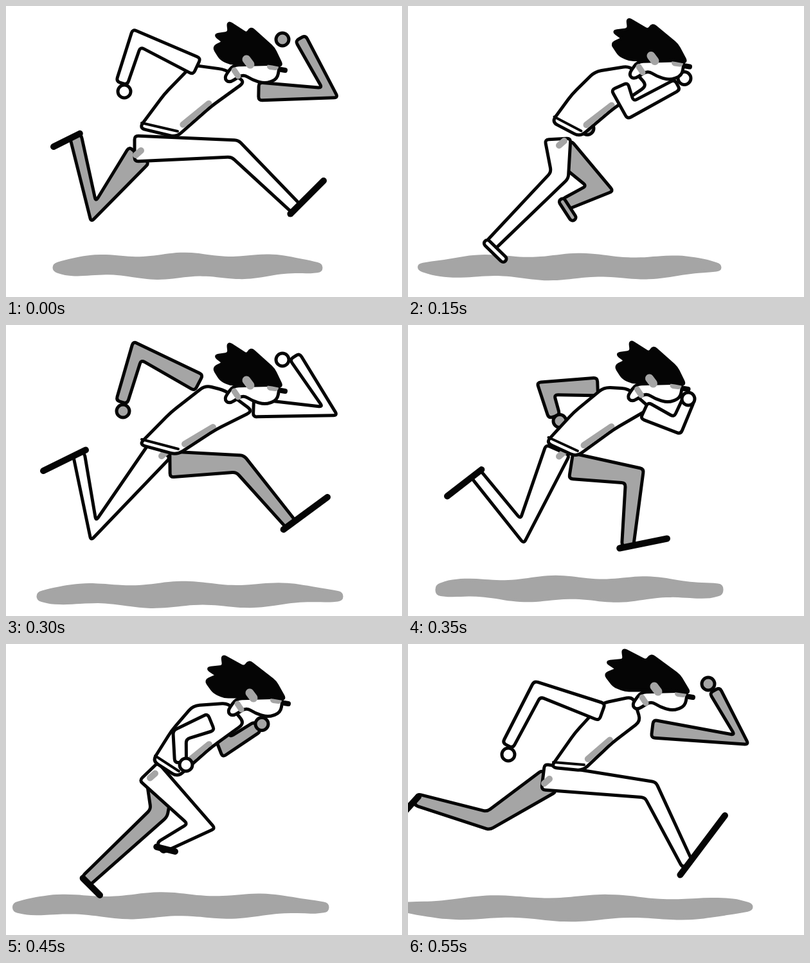
Animation, 616 px wide and 453 px high, one loop 600 ms. Source, as an HTML page with a canvas:

```html
<!DOCTYPE html>
<html lang="en">
<head>
<meta charset="utf-8">
<title>Run cycle</title>
<style>
  html, body { margin: 0; width: 100%; height: 100%; overflow: hidden; background: #fff; }
  canvas { display: block; }
</style>
</head>
<body>
<canvas id="stage" width="616" height="453"></canvas>
<script>
const ctx = document.getElementById('stage').getContext('2d');
const INK = '#050505', GREY = '#a5a5a5', WHITE = '#fff';
const STEP = 50;

// Arms: shoulder, elbow, wrist, fist. Legs: hip, knee, ankle, toe.
// Torso: shoulder, waist back, waist front, chest. Face: nose and hair stretch.
// Shadow: left, right, middle height. Sole: width of the light part of a shoe.
const solid = { sole: [0] }, hollow = { sole: [5] };

const flightNear = {
  ...solid,
  nearArm: [297, 94, 203, 50, 180, 120, 184, 133],
  farArm: [393, 133, 504, 135, 458, 50, 430, 52],
  nearLeg: [200, 222, 356, 222, 451, 315, 494, 272],
  farLeg: [207, 232, 136, 320, 108, 202, 74, 219],
  torso: [290, 92, 207, 190, 265, 204, 372, 118],
  face: [431, 100, 0.93],
  shadow: [75, 490, 405]
};

const standNear = {
  ...hollow,
  nearArm: [286, 110, 228, 160, 325, 148, 346, 136],
  farArm: [348, 138, 331, 177, 410, 186, 426, 193],
  nearLeg: [220, 210, 332, 252, 240, 385, 306, 397],
  farLeg: [221, 235, 224, 324, 98, 270, 60, 318],
  torso: [282, 98, 222, 175, 265, 207, 374, 110],
  face: [434, 97, 1],
  shadow: [50, 470, 401]
};

const pushNear = {
  ...hollow,
  nearArm: [372, 140, 464, 164, 513, 97, 514, 89],
  farArm: [275, 112, 208, 117, 133, 176, 132, 188],
  nearLeg: [246, 204, 140, 275, 15, 362, -10, 390],
  farLeg: [258, 212, 373, 244, 388, 348, 452, 340],
  torso: [300, 106, 225, 186, 270, 200, 370, 138],
  face: [436, 92, 1.03],
  shadow: [-15, 500, 411]
};

const flightFar = {
  ...solid,
  nearArm: [385, 129, 504, 134, 449, 49, 430, 54],
  farArm: [300, 90, 204, 40, 180, 120, 182, 134],
  nearLeg: [240, 194, 136, 320, 113, 200, 58, 227],
  farLeg: [255, 217, 364, 216, 443, 310, 500, 268],
  torso: [310, 94, 207, 186, 266, 202, 384, 134],
  face: [431, 103, 0.93],
  shadow: [50, 522, 420]
};

const standFar = {
  ...solid,
  nearArm: [350, 137, 334, 179, 425, 181, 442, 176],
  farArm: [290, 102, 224, 158, 275, 165, 290, 165],
  nearLeg: [226, 195, 219, 322, 98, 264, 64, 306],
  farLeg: [252, 222, 341, 254, 240, 380, 306, 397],
  torso: [300, 100, 222, 180, 258, 208, 370, 125],
  face: [434, 97, 0.96],
  shadow: [40, 454, 402]
};

const pushFar = {
  ...solid,
  nearArm: [288, 106, 206, 104, 118, 188, 118, 200],
  farArm: [368, 132, 461, 163, 508, 92, 506, 84],
  nearLeg: [218, 202, 389, 245, 380, 370, 462, 340],
  farLeg: [227, 216, 135, 272, 8, 358, -14, 385],
  torso: [282, 92, 234, 184, 276, 206, 372, 122],
  face: [438, 89, 1.2],
  shadow: [-15, 546, 413]
};

const liftFar = {
  ...solid,
  nearArm: [302, 106, 201, 70, 155, 158, 156, 172],
  farArm: [380, 132, 519, 149, 477, 72, 467, 62],
  nearLeg: [210, 207, 377, 227, 435, 344, 493, 267],
  farLeg: [220, 213, 125, 275, 12, 242, -8, 264],
  torso: [302, 92, 222, 192, 272, 197, 362, 120],
  face: [440, 83, 1.15],
  shadow: [-15, 534, 411]
};

const liftNear = {
  ...liftFar,
  nearLeg: liftFar.farLeg, farLeg: liftFar.nearLeg,
  nearArm: liftFar.farArm, farArm: liftFar.nearArm
};

const between = (a, b) => Object.fromEntries(Object.keys(a).map(part =>
  [part, a[part].map((v, i) => (v + b[part][i]) / 2)]));

const cycle = [
  flightNear, between(flightNear, standNear), standNear, between(standNear, pushNear),
  pushNear, liftNear, flightFar, between(flightFar, standFar),
  standFar, between(standFar, pushFar), pushFar, liftFar
];

// Head shapes, measured from the nose.
const jaw = pairs([-78, -8, -92, 12, -84, 20, -62, 6, -48, 15, -28, 21, -9, 14, -5, -10]);
const hair = pairs([-2, -7, -16, -34, -54, -66, -60, -56, -92, -75, -90, -58,
  -114, -55, -99, -44, -116, -36, -104, -18, -89, -11, -24, -11]);

function pairs(flat) {
  const points = [];
  for (let i = 0; i < flat.length; i += 2) points.push([flat[i], flat[i + 1]]);
  return points;
}

const lerp = (p, q, k) => [p[0] + (q[0] - p[0]) * k, p[1] + (q[1] - p[1]) * k];
const shift = (p, x, y) => [p[0] + x, p[1] + y];

function toward(p, q, radius) {
  const d = Math.hypot(q[0] - p[0], q[1] - p[1]) || 1;
  return lerp(p, q, Math.min(0.5, radius / d));
}

function shape(points, fill, radius = 6, width = 5, stroke = INK) {
  const n = points.length;
  ctx.beginPath();
  points.forEach((p, i) => {
    ctx.lineTo(...toward(p, points[(i + n - 1) % n], radius));
    ctx.quadraticCurveTo(...p, ...toward(p, points[(i + 1) % n], radius));
  });
  ctx.closePath();
  ctx.fillStyle = fill;
  ctx.fill();
  ctx.strokeStyle = stroke;
  ctx.lineWidth = width;
  ctx.stroke();
}

function line(p, q, color = INK, width = 5) {
  ctx.beginPath();
  ctx.moveTo(...p);
  ctx.lineTo(...q);
  ctx.strokeStyle = color;
  ctx.lineWidth = width;
  ctx.stroke();
}

function normal(p, q) {
  const d = Math.hypot(q[0] - p[0], q[1] - p[1]) || 1;
  return [(p[1] - q[1]) / d, (q[0] - p[0]) / d];
}

// Tapered tube around three joints with a pointed bend.
function limb([a, b, c], fill, [wa, wb, wc]) {
  const n = normal(a, b), m = normal(b, c);
  const bend = wb / Math.max(0.7, 1 + n[0] * m[0] + n[1] * m[1]);
  const side = s => [
    shift(a, n[0] * wa * s, n[1] * wa * s),
    shift(b, (n[0] + m[0]) * bend * s, (n[1] + m[1]) * bend * s),
    shift(c, m[0] * wc * s, m[1] * wc * s)
  ];
  shape([...side(1), ...side(-1).reverse()], fill);
}

function arm(flat, fill) {
  const joints = pairs(flat), fist = joints[3];
  limb(joints, fill, [14, 10, 9]);
  ctx.beginPath();
  ctx.arc(...fist, 10, 0, 2 * Math.PI);
  ctx.fill();
  ctx.stroke();
}

function leg(flat, fill, sole) {
  const joints = pairs(flat), [, , ankle, toe] = joints;
  limb(joints, fill, [20, 13, 9]);
  const heel = lerp(ankle, toe, -0.2);
  line(heel, toe, INK, 10 + sole);
  if (sole) line(heel, toe, fill, sole);
}

function torso(flat, nose) {
  const [shoulder, back, front, chest] = pairs(flat);
  const spine = shift(lerp(shoulder, back, 0.5), -2, -4);
  const belly = shift(lerp(front, chest, 0.5), 1, -5);
  shape([shift(nose, -90, -1), shoulder, spine, back, front, belly, chest], WHITE, 10);
  line(shift(back, 4, -8), shift(front, 2, -9), INK, 4);
  ctx.globalCompositeOperation = 'darken';
  line(shift(lerp(front, belly, 0.3), -6, -5), shift(belly, -4, -4), GREY, 10);
  ctx.globalCompositeOperation = 'source-over';
}

function head([x, y, stretch]) {
  const place = (px, py) => [x + px, y + py];
  shape(jaw.map(p => place(...p)), WHITE, 9);
  line(place(-76, 0), place(-70, 9), GREY, 9);
  line(place(-20, -6), place(-12, -5), GREY, 10);
  shape(hair.map(p => place(p[0] * stretch, p[1])), INK);
  line(place(-57, -17), place(-51, -9), GREY, 13);
  line(place(-3, -1), place(3, 0), INK, 8);
}

// Brushed patch with uneven edges, thin at both ends.
function shadow([left, right, y]) {
  const edge = side => Array.from({ length: 25 }, (_, i) => {
    const u = i / 24;
    const half = 5 + 11 * Math.sqrt(Math.sin(Math.PI * u)) + 3 * Math.sin(u * 19 + left + side);
    return [left + (right - left) * u, y + side * half];
  });
  shape([...edge(-1), ...edge(1).reverse()], GREY, 6, 5, GREY);
}

function draw() {
  const now = cycle[Math.floor(performance.now() / STEP) % cycle.length];
  ctx.fillStyle = WHITE;
  ctx.fillRect(0, 0, 616, 453);
  ctx.lineCap = ctx.lineJoin = 'round';
  shadow(now.shadow);
  leg(now.farLeg, GREY, now.sole[0]);
  arm(now.farArm, GREY);
  leg(now.nearLeg, WHITE, now.sole[0]);
  const hip = now.nearLeg;
  line(shift(hip, 2, 10), shift(hip, 10, 3), GREY, 10);
  torso(now.torso, now.face);
  arm(now.nearArm, WHITE);
  head(now.face);
  requestAnimationFrame(draw);
}
draw();
</script>
</body>
</html>
```
